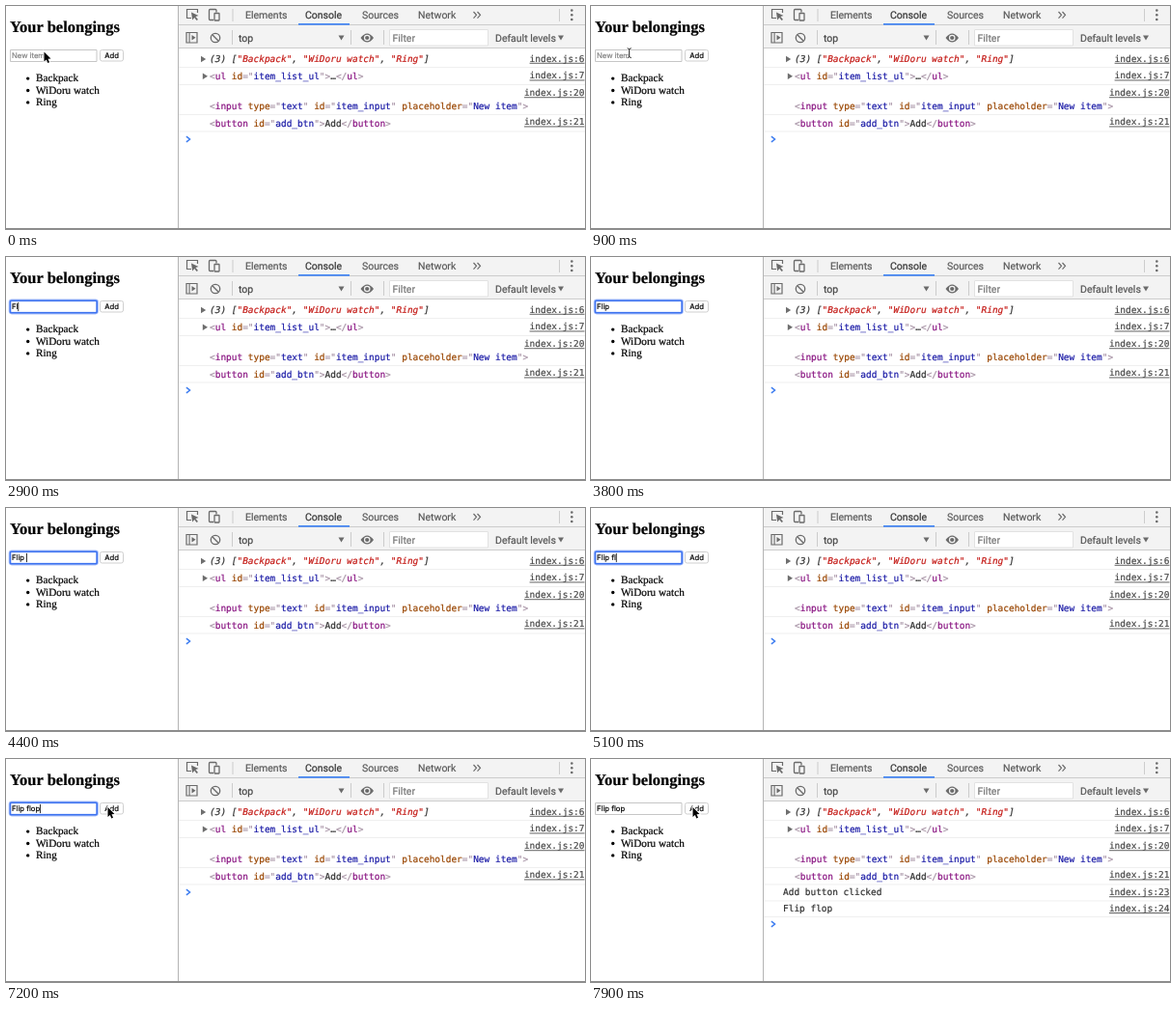
These frames come from a looping animation (600x231 px, 8000 ms). An HTML page with a canvas:

```html
<!DOCTYPE html>
<html lang="en">
<head>
<meta charset="utf-8">
<title>Your belongings</title>
<style>
  html, body { margin: 0; width: 100%; height: 100%; overflow: hidden; background: #fff; }
  canvas { display: block; width: 600px; height: 231px; }
</style>
</head>
<body>
<canvas id="stage"></canvas>
<script>
const W = 600, H = 231, LOOP = 8000;
const canvas = document.getElementById('stage');
const ctx = canvas.getContext('2d');
const dpr = window.devicePixelRatio || 1;
canvas.width = W * dpr;
canvas.height = H * dpr;
ctx.textRendering = 'geometricPrecision';

const SERIF = '"Liberation Serif", "Times New Roman", serif';
const MONO = '9.46px "DejaVu Sans Mono", Menlo, monospace';
const UI = '10.5px Roboto, "Liberation Sans", sans-serif';
const FIELD = '7.7px Inter, "Liberation Sans", sans-serif';

const TAG = '#881280', ATTR = '#994500', VALUE = '#1a1aa6', PUNCT = '#a894a6';
const STRING = '#c41a16', INK = '#303030', ICON = '#6a6a6a';

const FOCUS = 1000, BLUR = 7500, LOG = 7600;
const PHRASE = 'Flip flop';
const KEYS = [2600, 2800, 3000, 3200, 4400, 4700, 4900, 5500, 5900];

// A hairline outline gives the type a slightly heavier weight.
function text(str, x, y, font, color) {
  ctx.font = font;
  ctx.fillStyle = ctx.strokeStyle = color;
  ctx.lineWidth = 0.2;
  ctx.fillText(str, x, y);
  ctx.strokeText(str, x, y);
  return x + ctx.measureText(str).width;
}

function box(x, y, w, h, color) {
  ctx.fillStyle = color;
  ctx.fillRect(x, y, w, h);
}

function frame(x, y, w, h, color, r = 0, width = 1) {
  ctx.beginPath();
  ctx.roundRect(x, y, w, h, r);
  ctx.strokeStyle = color;
  ctx.lineWidth = width;
  ctx.stroke();
}

function path(points, fill, stroke, width = 1, close = true) {
  ctx.beginPath();
  points.forEach(([x, y]) => ctx.lineTo(x, y));
  if (close) ctx.closePath();
  if (stroke) {
    ctx.strokeStyle = stroke;
    ctx.lineWidth = width;
    ctx.stroke();
  }
  if (fill) {
    ctx.fillStyle = fill;
    ctx.fill();
  }
}

function disc(x, y, r, color) {
  ctx.beginPath();
  ctx.arc(x, y, r, 0, Math.PI * 2);
  ctx.fillStyle = color;
  ctx.fill();
}

function down(x, y) {
  path([[x - 3, y - 2.5], [x + 3, y - 2.5], [x, y + 2.5]], ICON);
}

function right(x, y) {
  path([[x - 2.2, y - 3.2], [x + 3, y], [x - 2.2, y + 3.2]], '#6e6e6e');
}

function runs(x, y, parts, style = '') {
  parts.forEach(([color, str]) => { x = text(str, x, y, style + MONO, color); });
}

const attr = (name, value) =>
  [[ATTR, ' ' + name], [PUNCT, '="'], [VALUE, value], [PUNCT, '"']];
const open = (tag, ...attrs) =>
  [[PUNCT, '<'], [TAG, tag], ...attrs.flat(), [PUNCT, '>']];
const shut = tag => [[PUNCT, '</'], [TAG, tag], [PUNCT, '>']];

function link(line, y) {
  const label = 'index.js:' + line;
  ctx.font = MONO;
  const x = 599.5 - ctx.measureText(label).width;
  text(label, x, y, MONO, '#484848');
  box(x, y + 1.3, 599.5 - x, 0.9, '#505050');
}

function page(t) {
  text('Your belongings', 4, 27, 'bold 16.5px ' + SERIF, '#000');
  ['Backpack', 'WiDoru watch', 'Ring'].forEach((item, i) => {
    const y = 78.4 + i * 12.4;
    disc(22.7, y - 3.3, 1.7, '#000');
    text(item, 31, y, '11.2px ' + SERIF, '#000');
  });

  const focused = t >= FOCUS && t < BLUR;
  if (focused) {
    frame(4, 44.9, 90.6, 13.2, '#a9c0fa', 2, 2.6);
    frame(4.4, 45.3, 89.8, 12.4, '#3f74f0', 1, 1.5);
  } else {
    frame(4.5, 45.5, 89.5, 12, '#c6c6c6');
  }

  const typed = KEYS.filter(k => k <= t).length;
  let end = 6;
  if (typed) end = text(PHRASE.slice(0, typed), 6, 54.3, FIELD, '#000');
  else text('New item', 6, 54.3, FIELD, '#808080');

  const since = t - (typed ? KEYS[typed - 1] : 800);
  if (focused && since % 1000 < 500) box(end, 46.9, 0.8, 9.2, '#000');

  frame(97.5, 45.5, 24, 11.5, '#cfcfcf', 2);
  text('Add', 102.2, 54.2, FIELD, '#000');
}

function tabBar() {
  box(179, 0, 421, 43, '#f3f3f3');
  box(179, 19, 421, 1, '#cccccc');
  box(179, 43, 421, 1, '#cccccc');

  path([[192, 12.5], [187.5, 12.5], [187.5, 3.5], [198.5, 3.5], [198.5, 7]], null, ICON, 1.2, false);
  path([[192, 6.5], [199.5, 10], [196.4, 11], [199, 14], [197.6, 15], [195.2, 12], [193.2, 14.5]], ICON);
  frame(210.5, 3.5, 7.5, 11, ICON, 1, 1.3);
  box(215, 6.5, 7, 9.5, '#f3f3f3');
  frame(216, 7.5, 5, 7.5, ICON, 0.5, 1.3);
  box(234.5, 3, 1, 13, '#cccccc');

  [['Elements', 248], ['Console', 310], ['Sources', 369], ['Network', 427]].forEach(([name, x]) =>
    text(name, x, 12.7, UI, name === 'Console' ? '#333' : '#5a5a5a'));
  box(303, 18, 53, 1.7, '#4285f4');
  for (const x of [484.5, 488.5])
    path([[x, 6], [x + 3, 9.3], [x, 12.6]], null, ICON, 1.2, false);
  box(573, 3, 1, 13, '#cccccc');
  for (const y of [4.5, 9.3, 14]) disc(586.3, y, 1.3, ICON);
}

function filterBar() {
  frame(187, 27.5, 11, 10.5, ICON, 0, 1.2);
  box(189.5, 27.5, 1.1, 10.5, ICON);
  path([[192.5, 30], [196.5, 32.8], [192.5, 35.6]], ICON);

  ctx.beginPath();
  ctx.arc(217, 33, 4.7, 0, Math.PI * 2);
  ctx.strokeStyle = ICON;
  ctx.lineWidth = 1.3;
  ctx.stroke();
  path([[213.8, 29.8], [220.2, 36.2]], null, ICON, 1.3, false);

  for (const x of [234, 357, 391]) box(x, 25, 1, 15, '#cccccc');
  text('top', 241, 36.5, UI, '#444');
  down(347.5, 33);

  ctx.beginPath();
  ctx.moveTo(367.5, 33);
  ctx.quadraticCurveTo(374.2, 24, 381, 33);
  ctx.quadraticCurveTo(374.2, 42, 367.5, 33);
  ctx.fillStyle = ICON;
  ctx.fill();
  disc(374.2, 33, 3.3, '#f3f3f3');
  disc(374.2, 33, 2.1, ICON);

  box(397, 24, 103, 17, '#fff');
  frame(397.5, 24.5, 102, 16.5, '#e2e2e2');
  text('Filter', 400.5, 36.6, UI, '#757575');
  text('Default levels', 507, 36.5, UI, '#555');
  down(575, 33);
}

function consoleLog(t) {
  const logged = t >= LOG;
  const lines = [63, 81, 112, 129.5];
  if (logged) lines.push(146.5, 163);
  lines.forEach(y => box(179, y, 421, 0.9, '#eeeeee'));

  right(204.2, 55);
  runs(211, 58.4, [
    [INK, '(3) ['], [STRING, '"Backpack"'], [INK, ', '],
    [STRING, '"WiDoru watch"'], [INK, ', '], [STRING, '"Ring"'], [INK, ']']
  ], 'italic ');
  right(206, 72.7);
  runs(211, 76, [...open('ul', attr('id', 'item_list_ul')), [INK, '…'], ...shut('ul')]);
  runs(211, 106.5, open('input', attr('type', 'text'), attr('id', 'item_input'),
    attr('placeholder', 'New item')));
  runs(211, 124.8, [...open('button', attr('id', 'add_btn')), [INK, 'Add'], ...shut('button')]);

  link(6, 57.5);
  link(7, 75.2);
  link(20, 93);
  link(21, 123.2);
  if (logged) {
    text('Add button clicked', 199, 141.2, MONO, INK);
    text(PHRASE, 199, 158, MONO, INK);
    link(23, 141);
    link(24, 157.8);
  }
  const y = logged ? 171 : 138;
  path([[186.9, y - 2.9], [190.5, y], [186.9, y + 2.9]], null, '#3c7cf0', 1.5, false);
}

function arrow(x, y) {
  const shape = [[0, 0], [0, 10], [2.3, 7.9], [3.8, 11.4], [5.5, 10.7], [4, 7.2], [7, 7]];
  path(shape.map(([a, b]) => [x + a, y + b]), '#000', '#fff', 1.8);
}

function beam(x, y) {
  for (const [color, width] of [['#fff', 2.2], ['#222', 1]]) {
    path([[x, y - 4], [x, y + 4]], null, color, width, false);
    for (const s of [-1, 1])
      path([[x - 2, y + s * 5], [x, y + s * 4], [x + 2, y + s * 5]], null, color, width, false);
  }
}

function pointer(t) {
  if (t >= KEYS[0] && t < 6400) return;
  const p = Math.min(1, Math.max(0, (t - 6400) / 600));
  const ease = p * p * (3 - 2 * p);
  const x = 39.7 + 65.8 * ease, y = 48.7 + 1.3 * ease;
  if (t < 700) arrow(39.5, 47.5);
  else if (x < 94) beam(x, y);
  else arrow(x, y);
}

function draw(now) {
  const t = now % LOOP;
  ctx.setTransform(dpr, 0, 0, dpr, 0, 0);
  box(0, 0, W, H, '#fff');
  page(t);
  tabBar();
  filterBar();
  consoleLog(t);
  box(178, 0, 1, H, '#b4b4b4');
  box(0, 230, W, 1, '#8c8c8c');
  pointer(t);
}

const start = performance.now();
function tick() {
  draw(performance.now() - start);
  requestAnimationFrame(tick);
}
tick();
</script>
</body>
</html>
```
